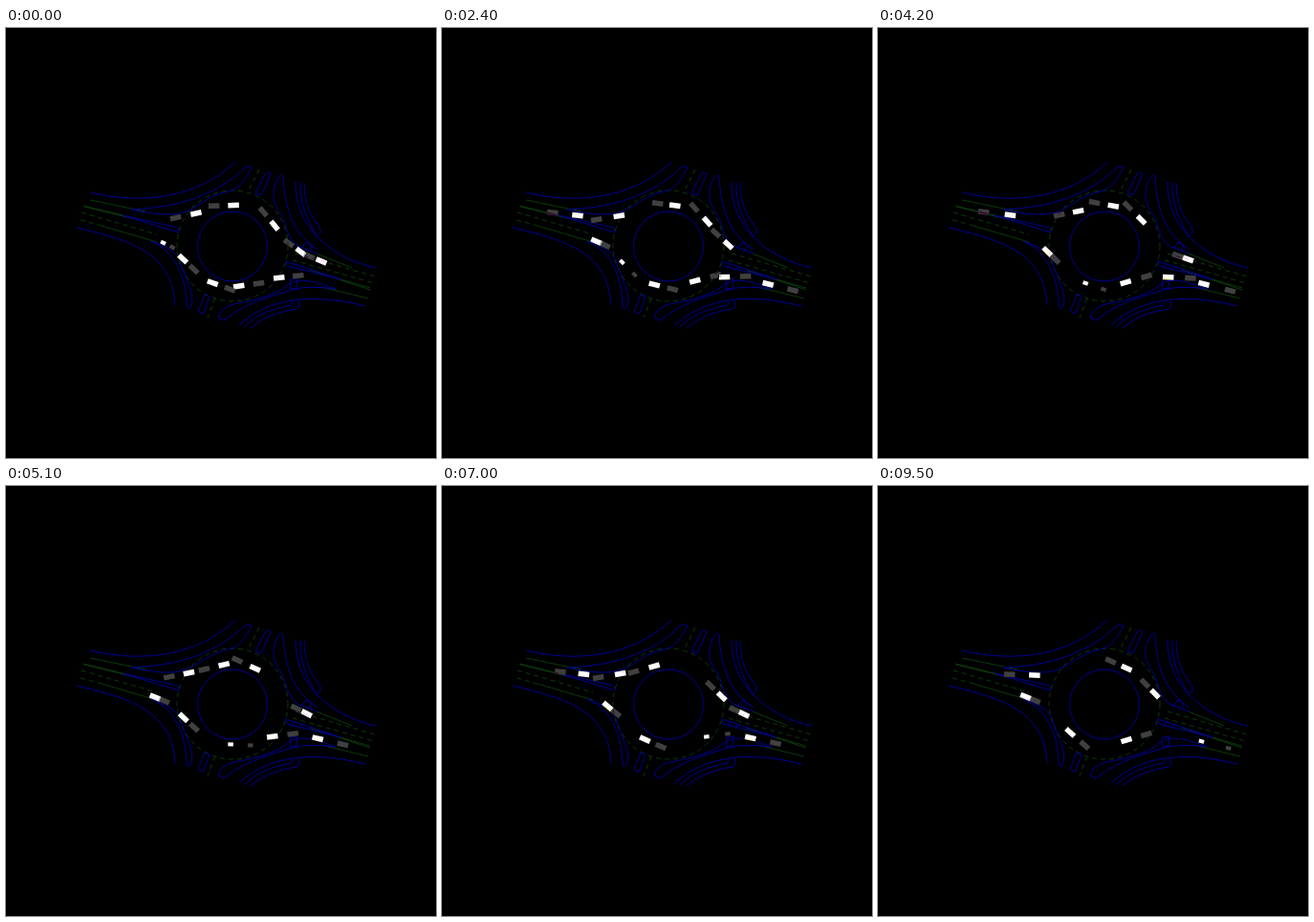
Animation of 450 by 450 pixels, one loop 9.6 s. Source, as an HTML page with a canvas:

```html
<!DOCTYPE html>
<html>
<head>
<meta charset="utf-8">
<title>Roundabout</title>
<style>
html, body { margin: 0; width: 100%; height: 100%; overflow: hidden; background: #000; }
canvas { display: block; }
</style>
</head>
<body>
<canvas id="stage" width="450" height="450"></canvas>
<script>
const ctx = document.getElementById('stage').getContext('2d');
const LOOP = 9600, STEP = 100;

// Road layout
const kerbs = new Path2D(`
  M273.5 228.5 A36.5 36.5 0 1 1 200.5 228.5 A36.5 36.5 0 1 1 273.5 228.5
  M88 172 C140 185 200 179 240 140
  M131 190 C180 188 220 175 249 147 Q253 143 257 146 C251 158 244 169 233 171
  C214 174 203 186 189 192 C172 198 150 194 131 190
  M261 173 L271 153 Q274 149 277 153 L267 175 Z
  M285 157 Q288 152 290 156 C292 188 299 214 326 232 M285 157 C276 172 280 184 287 194
  C295 206 292 218 305 228 L326 236
  M303 161 C302 208 340 241 387 251
  M308 162 C307 182 315 201 324 216 Q326 220 329 214 Q330 211 327 207 C316 193 312 178 312 162
  M309 231 L314 224 L320 228 L315 235
  M122 196 L180 209 M122 196 L181 214 L180 209
  M293 244 L350 263 L294 249 Z M302 246 L299 252 M311 249 L307 254
  M74 209 C130 222 174 235 177 290
  M152 223 C180 235 188 264 189 290 Q190 297 194 290 C198 276 187 263 182 243 Q177 231 152 223
  M201 296 L208 279 L213 281 L207 298 Q204 300 201 296
  M345 273 C320 264 308 261 296 268 C284 279 262 285 238 289 Q224 293 222 303 L228 306
  C250 288 276 281 300 274 Q315 269 345 273
  M244 311 C268 288 310 274 376 291
  M249 313 C262 299 279 294 299 290 L300 285 M256 314 C270 302 285 297 304 294 L307 291 L306 285
  M298 263 L305 262 L304 272 L297 273 Z`);
const lanes = new Path2D(`
  M88 180 L146 192 M82 187 L135 200 M81 186 L122 196 M100 207 L158 224
  M325 236 L362 251 M318 253 L381 274 M350 263 L381 272 M330 271 L379 283`);
const dashes = new Path2D(`
  M295 228 A58 58 0 1 1 179 228 A58 58 0 1 1 295 228
  M79 193 L158 216 M78 201 L100 207
  M303 236 L386 260 M300 243 L385 267
  M265 148 L253 172 M219 283 L211 303`);

// A route is a spline through points spaced SPAN seconds apart, the first lying one span before time 0
const SPAN = 1.6;
const east = {
  min: 150, max: 344,
  points: [[140, 216], [156, 221], [171, 228.5], [186, 242.5], [209, 263.5], [239, 270.5],
    [273, 263], [308, 261], [350, 270], [396, 281]]
};
const west = {
  min: 137, max: 333,
  points: [[350, 252], [330, 244], [311, 236], [291, 218.5], [270, 196], [241, 185.5],
    [208.5, 192], [173, 198], [132, 195], [88, 188]]
};

// `start` is the route time when the loop begins, `pace` the speed relative to the route
const car = (route, start, pace) => ({ route, start, pace, length: 11.5, width: 5.5 });
const vehicles = [
  { ...car(east, 0.9, 1.04), length: 5.5, width: 4 },
  car(east, 8.6, 0.95), car(east, 6.63, 1.01), car(east, 5.22, 1), car(east, 3.12, 1.01),
  car(east, -1.72, 0.96), car(east, -5, 0.98), car(east, -9.65, 1),
  car(west, 8.45, 0.99), car(west, 6.55, 1.05), car(west, 4, 0.94), car(west, 1.8, 1.03),
  car(west, 0, 1.05), car(west, -3.45, 0.93), car(west, -4.7, 0.84)];

// Catmull-Rom position and velocity at a route time
function along(points, time) {
  const u = time / SPAN + 1;
  const i = Math.min(points.length - 3, Math.max(1, Math.floor(u))), s = u - i;
  const [a, b, c, d] = points.slice(i - 1, i + 3);
  const axes = [0, 1].map(n => {
    const k1 = (c[n] - a[n]) / 2;
    const k2 = a[n] - 2.5 * b[n] + 2 * c[n] - d[n] / 2;
    const k3 = (d[n] - a[n] + 3 * (b[n] - c[n])) / 2;
    return [b[n] + s * (k1 + s * (k2 + s * k3)), (k1 + s * (2 * k2 + s * 3 * k3)) / SPAN];
  });
  return { x: axes[0][0], y: axes[1][0], vx: axes[0][1], vy: axes[1][1] };
}

function box(x, y, angle, { length, width }, color) {
  ctx.save();
  ctx.translate(x, y);
  ctx.rotate(angle);
  ctx.fillStyle = color;
  ctx.fillRect(-length / 2, -width / 2, length, width);
  ctx.restore();
}

function drawVehicle(vehicle, t) {
  const { route, start, pace } = vehicle, time = start + pace * t;
  if (time < -SPAN) return;
  const { x, y, vx, vy } = along(route.points, time);
  if (x < route.min || x > route.max) return;
  const angle = Math.atan2(vy, vx);
  box(x + vx * pace, y + vy * pace, angle, vehicle, '#404040'); // expected place one second ahead
  box(x, y, angle, vehicle, '#fff');
}

function stroke(path, color, dash = []) {
  ctx.strokeStyle = color;
  ctx.setLineDash(dash);
  ctx.stroke(path);
}

function draw(now) {
  const t = Math.floor(now % LOOP / STEP) * STEP / 1000;
  ctx.globalCompositeOperation = 'source-over';
  ctx.fillStyle = '#000';
  ctx.fillRect(0, 0, 450, 450);
  stroke(lanes, '#0b3a0b');
  stroke(dashes, '#0b3a0b', [5, 4]);
  stroke(kerbs, '#000092');
  ctx.globalCompositeOperation = 'difference';
  vehicles.forEach(v => drawVehicle(v, t));
}

const start = performance.now();
function tick() {
  draw(performance.now() - start);
  requestAnimationFrame(tick);
}
tick();
</script>
</body>
</html>
```
